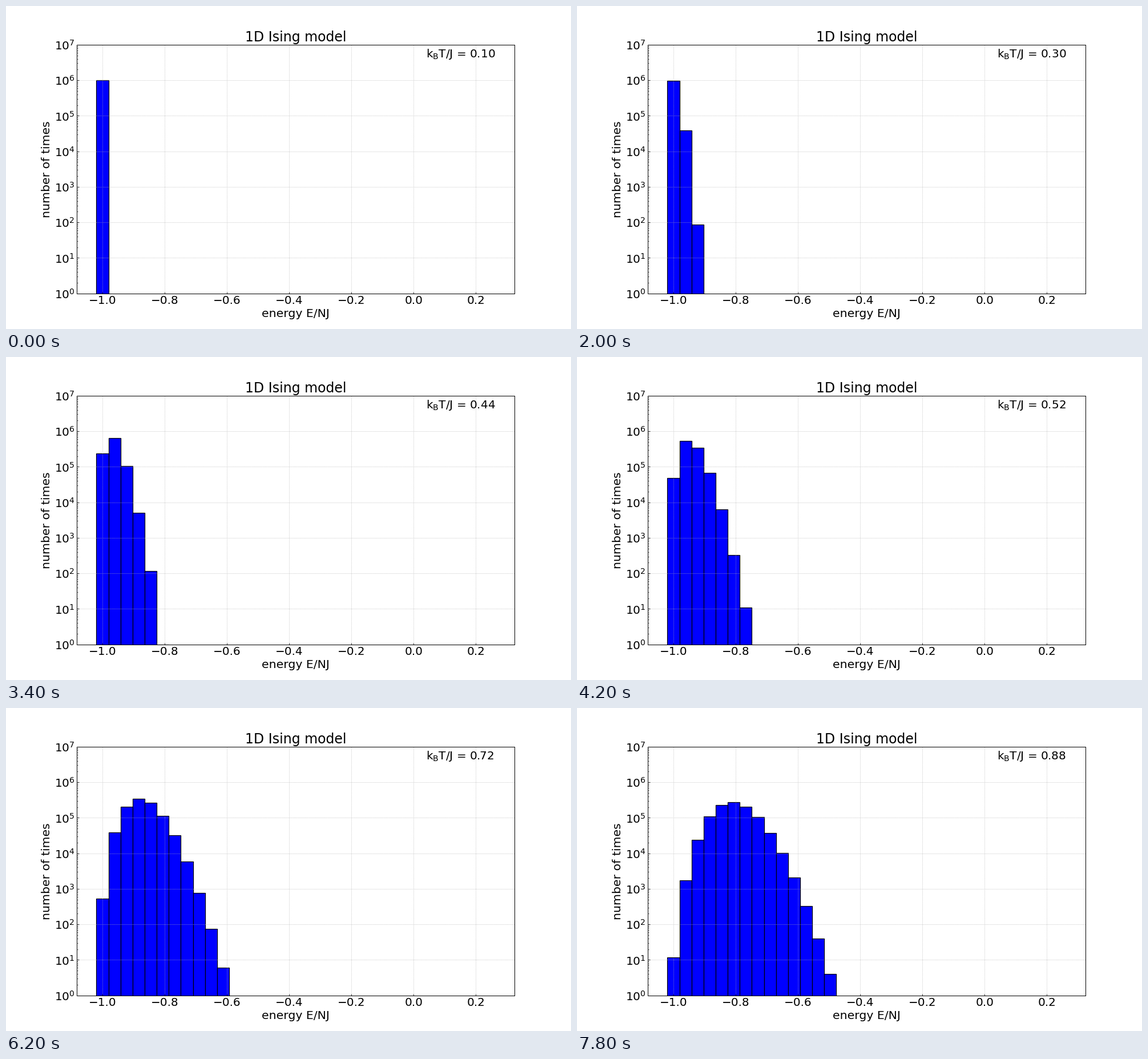
These frames come from a looping animation (990x566 px, 8 s). A matplotlib script:

```python
import math

import numpy as np
import matplotlib.pyplot as plt
from matplotlib.animation import FuncAnimation

W, H, DPI = 990, 566, 72
FRAMES, INTERVAL = 40, 200
SPINS, SAMPLES = 100, 1e6

plt.rcParams.update({
    "font.family": "DejaVu Sans",
    "font.size": 20,
    "axes.titlesize": 23.6,
    "axes.labelsize": 20.4,
    "axes.linewidth": 1,
})

edges = np.linspace(-1.02, 0.26, 34)
pairs = np.arange(32)                       # pairs of domain walls
walls = 2 * pairs
energy = -1 + 2 * walls / SPINS
ways = np.array([math.comb(SPINS, int(k)) for k in walls], dtype=float)
# mean number of spins that touch a wall and so flip freely
loose = SPINS * (1 - (SPINS - walls) * (SPINS - 1 - walls) / (SPINS * (SPINS - 1)))


def histogram(temp):
    """Expected counts per energy bin for a chain sampled at kT/J = temp."""
    q = math.exp(-4 / temp)
    prob = ways * q ** pairs * (1 + loose + (SPINS - loose) * q)
    # excitations hardly ever occur when the chain is cold
    prob[1:] *= 1 - math.exp(-(SPINS * SAMPLES * q / 1.7) ** 3)
    counts = np.round(SAMPLES * prob / prob.sum())
    return np.histogram(energy, bins=edges, weights=counts)[0]


fig, ax = plt.subplots(figsize=(W / DPI, H / DPI), dpi=DPI)
fig.subplots_adjust(left=0.125, right=0.9, bottom=0.11, top=0.88)

bars = ax.bar(edges[:-1], np.zeros(len(edges) - 1), np.diff(edges),
              align="edge", color="blue", edgecolor="black", linewidth=1.2)
ax.set_yscale("log")
ax.set_xlim(-1.0837, 0.3243)
ax.set_ylim(1, 1e7)
ax.set_xticks(np.arange(-5, 2) / 5)
ax.set_yticks(10.0 ** np.arange(8))
ax.tick_params(which="both", direction="in")
ax.grid(linestyle=":")
ax.set_title("1D Ising model")
ax.set_xlabel("energy E/NJ")
ax.set_ylabel("number of times")
label = ax.text(0.04, 4.4e6, "")


def update(i):
    temp = 0.10 + 0.02 * i
    for bar, count in zip(bars, histogram(temp)):
        bar.set_height(count)
    label.set_text(r"k$_\mathrm{B}$T/J = %.2f" % temp)
    return [*bars, label]


anim = FuncAnimation(fig, update, frames=FRAMES, interval=INTERVAL,
                     repeat=True, repeat_delay=0, blit=False)
plt.show()
```
